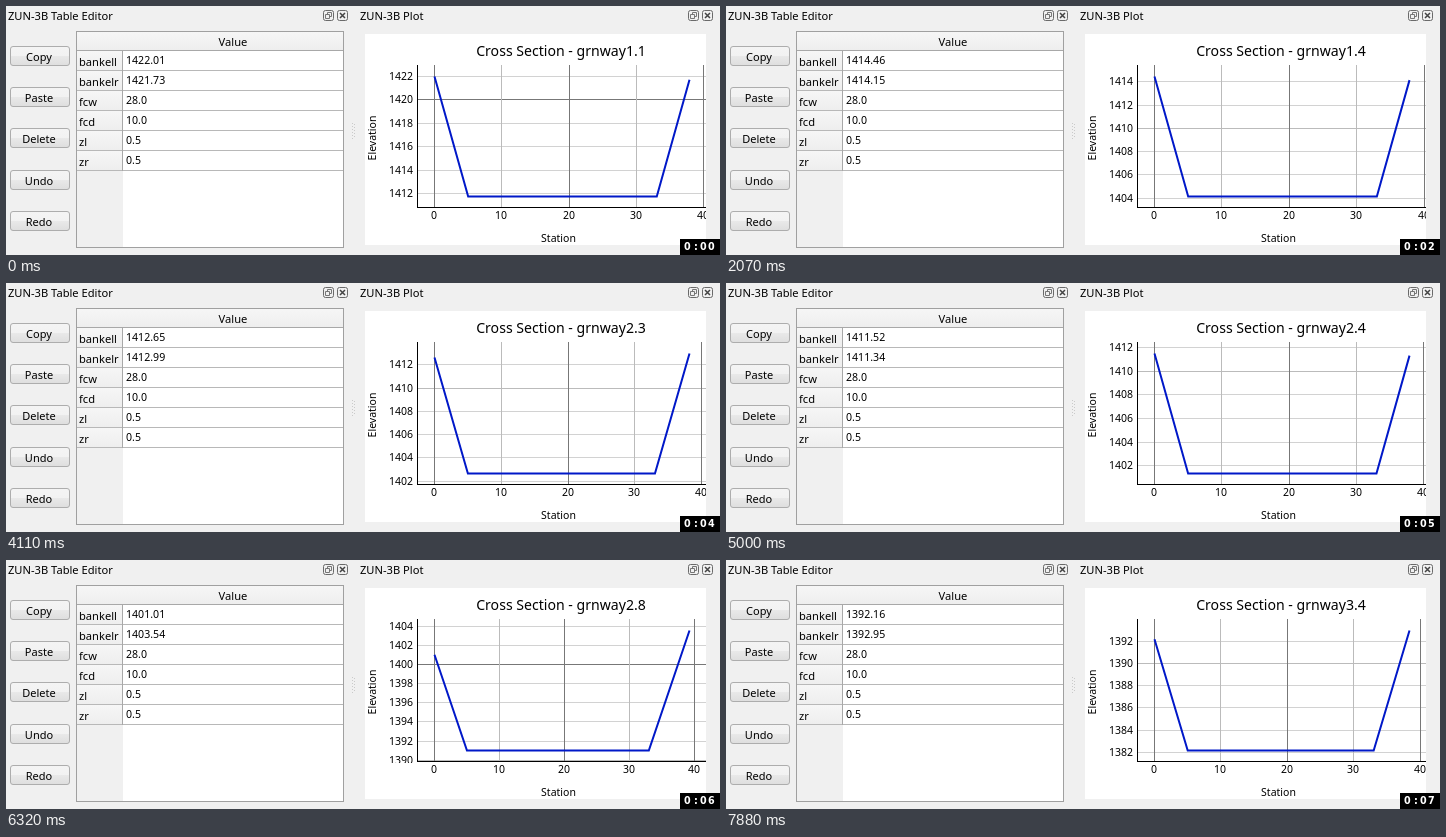
An HTML page for the animation above (8000 ms loop, 714 by 249 pixels).

```html
<!DOCTYPE html>
<html lang="en">
<head>
<meta charset="utf-8">
<title>Cross section browser</title>
<style>
  html, body { margin: 0; width: 100%; height: 100%; overflow: hidden; background: #f0f0f0; }
  svg { display: block; width: 714px; height: 249px; }
  text { font: 11px "Noto Sans", "Open Sans", sans-serif; fill: #000; white-space: pre; }
  .bar { font-size: 11.15px; }
  .val { font-size: 10.6px; }
  .tick, .axis { font-size: 10.5px; }
  .title { font-size: 14.1px; }
  .mid { text-anchor: middle; }
  .end { text-anchor: end; }
  .clock { font: bold 9.6px "DejaVu Sans", sans-serif; fill: #fff; }
  line, .crisp { shape-rendering: crispEdges; }
</style>
</head>
<body>
<svg viewBox="0 0 714 249" xmlns="http://www.w3.org/2000/svg">
  <defs>
    <linearGradient id="btn" x2="0" y2="1">
      <stop offset="0" stop-color="#f4f4f4"/>
      <stop offset=".5" stop-color="#f2f2f2"/>
      <stop offset=".5" stop-color="#e9e9e9"/>
      <stop offset="1" stop-color="#dedede"/>
    </linearGradient>
    <linearGradient id="head" x2="0" y2="1">
      <stop offset="0" stop-color="#f6f6f6"/>
      <stop offset="1" stop-color="#eeeeee"/>
    </linearGradient>
    <clipPath id="panel"><rect x="359" y="28" width="341" height="211"/></clipPath>
    <clipPath id="yLabels"><rect x="359" y="28" width="52" height="175"/></clipPath>
    <g id="icons" fill="none" stroke="#6a6a6a">
      <rect x=".5" y=".5" width="10" height="10" rx="2"/>
      <path d="M4.5 4.5V2.5H8.5V6.5H6.5M2.5 4.5H6.5V8.5H2.5Z" stroke-width=".9"/>
      <rect x="14.5" y=".5" width="10" height="10" rx="2"/>
      <path d="M17 3L22 8M22 3L17 8" stroke="#444" stroke-width="1.5"/>
    </g>
  </defs>

  <rect width="714" height="249" fill="#f0f0f0"/>
  <text class="bar" x="2" y="14">ZUN-3B Table Editor</text>
  <text class="bar" x="354" y="14">ZUN-3B Plot</text>
  <use href="#icons" x="317" y="4"/>
  <use href="#icons" x="682" y="4"/>
  <path d="M346.5 117V133M348.5 118V133" stroke="#cacaca" stroke-dasharray="1 2" fill="none"/>

  <g id="buttons"></g>

  <rect class="crisp" x="70.5" y="25.5" width="267" height="216" fill="#fff" stroke="#a0a0a0"/>
  <rect x="71" y="26" width="266" height="18" fill="url(#head)"/>
  <rect x="71" y="45" width="46" height="196" fill="#f0f0f0"/>
  <line x1="71" x2="337" y1="44.5" y2="44.5" stroke="#a8a8a8"/>
  <text class="bar mid" x="227" y="40">Value</text>
  <g id="table"></g>

  <rect x="359" y="28" width="341" height="211" fill="#fff"/>
  <text class="title mid" id="title" x="555" y="50"></text>
  <g clip-path="url(#panel)">
    <g id="grid"></g>
    <g id="xLabels"></g>
    <g id="yTicks" clip-path="url(#yLabels)"></g>
    <path class="crisp" d="M411.5 59V201.5H700" fill="none" stroke="#000"/>
    <polyline id="curve" fill="none" stroke="#0018c8" stroke-width="2"/>
  </g>
  <text class="axis mid" x="552.5" y="236">Station</text>
  <text class="axis mid" transform="translate(370 132) rotate(-90)">Elevation</text>

  <rect x="674" y="233" width="40" height="16" fill="#000"/>
  <text class="clock" id="clock" x="678 688 694 702" y="244"></text>
</svg>

<script>
const LOOP = 8000;
const TICKS = [990, 1920, 3000, 3960, 5000, 6050, 7030];
// start time, section, left bank, right bank
const SECTIONS = [
  [0, '1.1', 1422.01, 1421.73],
  [1110, '1.2', 1419.12, 1418.74],
  [1550, '1.3', 1416.62, 1416.25],
  [2070, '1.4', 1414.46, 1414.15],
  [2470, '1.5', 1413.92, 1415.38],
  [2900, '1.6', 1414.74, 1417.1],
  [3430, '2.1', 1416.85, 1416.43],
  [3710, '2.2', 1414.71, 1414.94],
  [4110, '2.3', 1412.65, 1412.99],
  [4540, '2.4', 1411.52, 1411.34],
  [5100, '2.5', 1410.16, 1409.23],
  [5500, '2.6', 1408.08, 1406.86],
  [5900, '2.7', 1404.53, 1405.02],
  [6320, '2.8', 1401.01, 1403.54],
  [6750, '3.1', 1404.27, 1403.83],
  [7150, '3.2', 1401.36, 1400.92],
  [7580, '3.3', 1395.42, 1396.05],
  [7880, '3.4', 1392.16, 1392.95]
];
const WIDTH = 28, DEPTH = 10, SLOPE = 0.5;
const VIEW = { right: 700.5, top: 59, bottom: 202 };

const el = id => document.getElementById(id);
const text = (cls, x, y, s) => `<text class="${cls}" x="${x}" y="${y}">${s}</text>`;
const line = (x1, y1, x2, y2, stroke) =>
  `<line x1="${x1}" y1="${y1}" x2="${x2}" y2="${y2}" stroke="${stroke}"/>`;

function gridColor(v) {
  if (v % 20 === 0) return '#777';
  return v % 10 === 0 ? '#bbb' : '#d2d2d2';
}

el('buttons').innerHTML = ['Copy', 'Paste', 'Delete', 'Undo', 'Redo'].map((name, i) => {
  const y = Math.floor(40 + i * 41.4);
  return `<rect x="4.5" y="${y + 0.5}" width="59" height="19" rx="2.5" fill="url(#btn)" stroke="#adadad"/>`
    + text('mid', 33, y + 15, name);
}).join('');

function drawTable(left, right) {
  const rows = [['bankell', left], ['bankelr', right], ['fcw', '28.0'],
    ['fcd', '10.0'], ['zl', '0.5'], ['zr', '0.5']];
  el('table').innerHTML = rows.map(([name, value], i) => {
    const y = 45 + i * 20;
    return `<rect x="71" y="${y}" width="45" height="19" fill="url(#head)"/>`
      + line(71, y + 19.5, 337, y + 19.5, '#b8b8b8')
      + line(116.5, y, 116.5, y + 20, '#a8a8a8')
      + text('bar', 73, y + 15, name) + text('val', 120, y + 13, value);
  }).join('');
}

function drawPlot(left, right) {
  const floor = Math.min(left, right) - DEPTH;
  const toe = DEPTH * SLOPE;
  const end = toe + WIDTH + SLOPE * (right - left + DEPTH);
  const sx = 255 / end;
  const sy = 120 / (Math.max(left, right) - floor);
  const px = x => 428.5 + x * sx;
  const py = y => 190.5 - (y - floor) * sy;

  let grid = '', xText = '', yText = '';
  for (let v = 2 * Math.ceil((floor - 3) / 2); v < floor + 20; v += 2) {
    if (py(v) < VIEW.top || py(v) > VIEW.bottom) continue;
    const y = Math.floor(py(v));
    grid += line(412, y + 0.5, 700, y + 0.5, gridColor(v));
    yText += text('tick end', 407, y + 4, v);
  }
  for (let v = 0; px(v) <= VIEW.right; v += 10) {
    const x = Math.floor(px(v));
    grid += line(x + 0.5, 59, x + 0.5, 201, gridColor(v));
    xText += text('tick mid', x, 213, v);
  }
  el('grid').innerHTML = grid;
  el('xLabels').innerHTML = xText;
  el('yTicks').innerHTML = yText;
  el('curve').setAttribute('points',
    [[0, left], [toe, floor], [toe + WIDTH, floor], [end, right]]
      .map(([x, y]) => px(x).toFixed(2) + ',' + py(y).toFixed(2)).join(' '));
}

let shown = null;

function render(t) {
  const section = SECTIONS.findLast(s => s[0] <= t);
  if (section !== shown) {
    shown = section;
    const [, name, left, right] = section;
    el('title').textContent = 'Cross Section - grnway' + name;
    drawTable(left, right);
    drawPlot(left, right);
  }
  el('clock').textContent = '0:0' + TICKS.filter(k => k <= t).length;
}

const start = performance.now();
function frame() {
  render((performance.now() - start) % LOOP);
  requestAnimationFrame(frame);
}
render(0);
requestAnimationFrame(frame);
</script>
</body>
</html>
```
